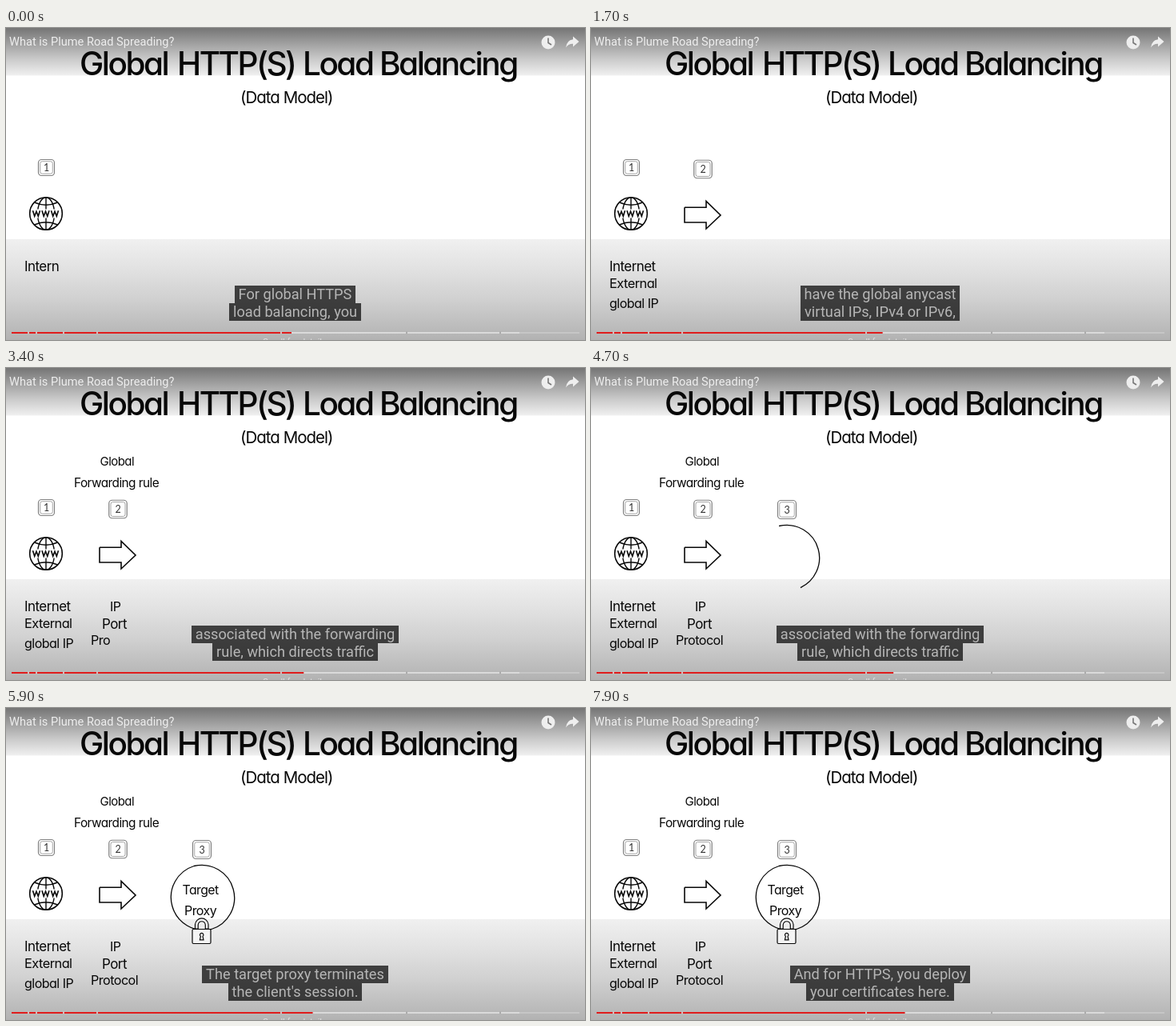
Animation, 724 px wide and 390 px high, one loop 8 s. Source, as an HTML page:

```html
<!DOCTYPE html>
<html lang="en">
<head>
<meta charset="utf-8">
<title>Load balancing data model</title>
<style>
html, body { margin: 0; width: 100%; height: 100%; overflow: hidden; background: #fff; }
#stage { position: relative; width: 724px; height: 390px; overflow: hidden; }
svg { position: absolute; left: 0; top: 0; }
.hand { font-family: Inter, Lato, sans-serif; font-weight: 400; font-feature-settings: "cv11"; letter-spacing: -.035em; fill: #080808; }
.ui { font-family: Roboto, Arial, sans-serif; }
.ink { fill: none; stroke: #080808; stroke-width: 1.6; }
#heading { font-weight: 500; letter-spacing: -2.5px; }
#caption { position: absolute; left: 0; top: 321.5px; width: 723px; font: 18.2px/22px Roboto, Arial, sans-serif; color: #b6b6b6; }
#caption div { width: fit-content; height: 22px; margin: 0 auto; padding: 0 5px; background: rgba(8, 8, 8, .73); white-space: pre; }
</style>
</head>
<body>
<div id="stage">
<svg width="724" height="390" viewBox="0 0 724 390">
  <defs>
    <linearGradient id="shade" x1="0" y1="0" x2="0" y2="1">
      <stop offset="0" stop-color="#757575"/>
      <stop offset=".05" stop-color="#a0a0a0"/>
      <stop offset=".1" stop-color="#cacaca"/>
      <stop offset=".152" stop-color="#f0f0f0"/>
      <stop offset=".153" stop-color="#fff"/>
      <stop offset=".676" stop-color="#fff"/>
      <stop offset=".677" stop-color="#f0f0f0"/>
      <stop offset=".77" stop-color="#e2e2e2"/>
      <stop offset=".87" stop-color="#d0d0d0"/>
      <stop offset="1" stop-color="#b2b2b2"/>
    </linearGradient>
  </defs>
  <rect width="724" height="390" fill="url(#shade)"/>

  <g class="hand" id="heading" font-size="40.5"></g>
  <text class="hand" x="293" y="94" font-size="20.5" style="letter-spacing:-1px">(Data Model)</text>

  <g class="ui" fill="#eee">
    <text x="4" y="22" font-size="14.6">What is Plume Road Spreading?</text>
    <circle cx="678" cy="18" r="8.5"/>
    <path d="M678 12.5V18.5L682 21" fill="none" stroke="#777" stroke-width="1.6"/>
    <path d="M709 10.5L716.5 17L709 23.5V19.7Q703 19.6 700 24.5Q701 15.5 709 14.3Z"/>
  </g>

  <g id="globe" class="ink">
    <circle cx="50" cy="232" r="20.3"/>
    <ellipse cx="50" cy="232" rx="10.5" ry="20.3" stroke-width="1.4"/>
    <path d="M50 212V252M35.5 218Q50 224.5 64.5 218M35.5 246Q50 239.5 64.5 246" stroke-width="1.4"/>
    <rect x="31" y="226.5" width="38" height="11" fill="#fff" stroke="none"/>
    <path id="www"/>
  </g>
  <g id="keys"></g>

  <path id="arrow" class="ink" pathLength="1" d="M117 224.3H144V216.5L162 234L144 251V243H117V224.3"/>
  <path id="ring" class="ink" style="stroke-width:1.3" pathLength="1" d="M235.1 197.5A41 41 0 0 1 256.9 276.5A41 41 0 0 1 235.1 197.5"/>
  <g id="labels" class="hand"></g>
  <g id="lock" class="ink" style="stroke-width:1.2">
    <path pathLength="1" d="M236.5 276V270.5A8.3 8.5 0 0 1 253 270.5V276H249.3V271A4.6 5 0 0 0 240.2 271V276Z"/>
    <path pathLength="1" d="M234.5 276.5H254.5Q256 276.5 256 278V293Q256 294.5 254.5 294.5H234.5Q233 294.5 233 293V278Q233 276.5 234.5 276.5Z"/>
    <path pathLength="1" d="M243.4 285.4A2.2 2.2 0 1 1 246 285.4L247 289.8H242.4Z"/>
  </g>

  <rect x="7" y="380" width="710" height="2" fill="#fff" opacity=".2"/>
  <rect x="7" y="380" width="635" height="2" fill="#fff" opacity=".35"/>
  <rect id="played" x="7" y="380" height="2" fill="#e01c1c"/>
  <g id="marks"></g>
  <text class="ui" x="361" y="395.5" font-size="11" text-anchor="middle" fill="#eee" opacity=".8">Scroll for details</text>
</svg>
<div id="caption"><div></div><div></div></div>
</div>

<script>
const LOOP = 8000, STEP = 100;
const $ = id => document.getElementById(id);
const clamp = v => Math.max(0, Math.min(1, v));
const progress = (t, start, length) => clamp((t - start) / length);

function add(parent, tag, attrs, text = "") {
  const el = document.createElementNS("http://www.w3.org/2000/svg", tag);
  for (const name in attrs) el.setAttribute(name, attrs[name]);
  el.textContent = text;
  return parent.appendChild(el);
}

for (const [word, x] of [["Global", 92], ["HTTP(S)", 214], ["Load", 371], ["Balancing", 467]])
  add($("heading"), "text", { x, y: 59 }, word);

// Three zigzag letters across the globe's band
$("www").setAttribute("d", [33.5, 45, 56.5].map(x => `M${x} 228.3l2.2 7 2.3-6 2.3 6 2.2-7`).join(""));

// digit, centre x, centre y, size, time shown
const keys = [[1, 50.5, 174.5, 20, -1], [2, 140, 176.5, 22.5, 800], [3, 245, 177, 23, 4200]]
  .map(([digit, x, y, size, start]) => {
    const el = add($("keys"), "g", {});
    const box = (s, r, width) => add(el, "rect", {
      x: x - s / 2, y: y - s / 2, width: s, height: s, rx: r,
      fill: "#fff", stroke: "#808080", "stroke-width": width
    });
    box(size, 4, 1.2);
    box(size - 4.5, 2.5, .7);
    add(el, "text", {
      x, y: y + 4.5, "text-anchor": "middle", "font-size": 12.5,
      "font-family": "Lato, sans-serif", fill: "#333"
    }, digit);
    return { el, start };
  });

// text, x, baseline, size, start, duration
const labels = [
  ["Internet", 23, 304, 17, -180, 240],
  ["External", 23, 325, 16.4, 60, 240],
  ["global IP", 23, 350, 16.1, 300, 300],
  ["Global", 117.5, 122, 15, 2750, 150],
  ["Forwarding rule", 85, 149, 15.4, 2900, 250],
  ["IP", 130, 304, 16, 3150, 50],
  ["Port", 120, 326, 17, 3200, 100],
  ["Protocol", 106, 346, 16.2, 3300, 240],
  ["Target", 220.5, 233, 15.8, 4950, 200],
  ["Proxy", 223, 259, 16, 5150, 200]
].map(([text, x, y, size, start, length]) =>
  ({ text, start, length, el: add($("labels"), "text", { x, y, "font-size": size }) }));

const captions = [
  [0, "For global HTTPS", "load balancing, you"],
  [1500, "have the global anycast", "virtual IPs, IPv4 or IPv6,"],
  [3000, "associated with the forwarding", "rule, which directs traffic"],
  [5300, "The target proxy terminates", "the client's session."],
  [7500, "And for HTTPS, you deploy", "your certificates here."]
];

for (const x of [28, 38, 72, 114, 344, 501, 618])
  add($("marks"), "rect", { x: x - .8, y: 379.6, width: 1.6, height: 2.6, fill: x < 350 ? "#ddd" : "#a0a0a0" });

function trace(path, part) {
  path.style.visibility = part > 0 ? "visible" : "hidden";
  path.style.strokeDasharray = part < 1 ? `${part} 2` : "none";
}

function draw(t) {
  for (const { el, start } of keys) el.style.visibility = t >= start ? "visible" : "hidden";
  for (const { el, text, start, length } of labels)
    el.textContent = text.slice(0, Math.floor(progress(t, start, length) * text.length + .01));

  trace($("arrow"), progress(t, 980, 420));
  trace($("ring"), progress(t, 4480, 460));
  [...$("lock").children].forEach((path, i) => {
    const part = progress(t, 5350 + i * 120, 120);
    trace(path, part);
    path.style.fill = part === 1 ? "#f4f4f4" : "none";
  });

  const [, ...lines] = captions.filter(c => t >= c[0]).pop();
  lines.forEach((line, i) => $("caption").children[i].textContent = line);
  $("played").setAttribute("width", 350 + t * .0045);
}

const begin = performance.now();
let shown = -1;
function tick(now) {
  const t = Math.floor(Math.max(0, now - begin) % LOOP / STEP) * STEP;
  if (t !== shown) draw(shown = t);
  requestAnimationFrame(tick);
}
draw(0);
requestAnimationFrame(tick);
</script>
</body>
</html>
```
